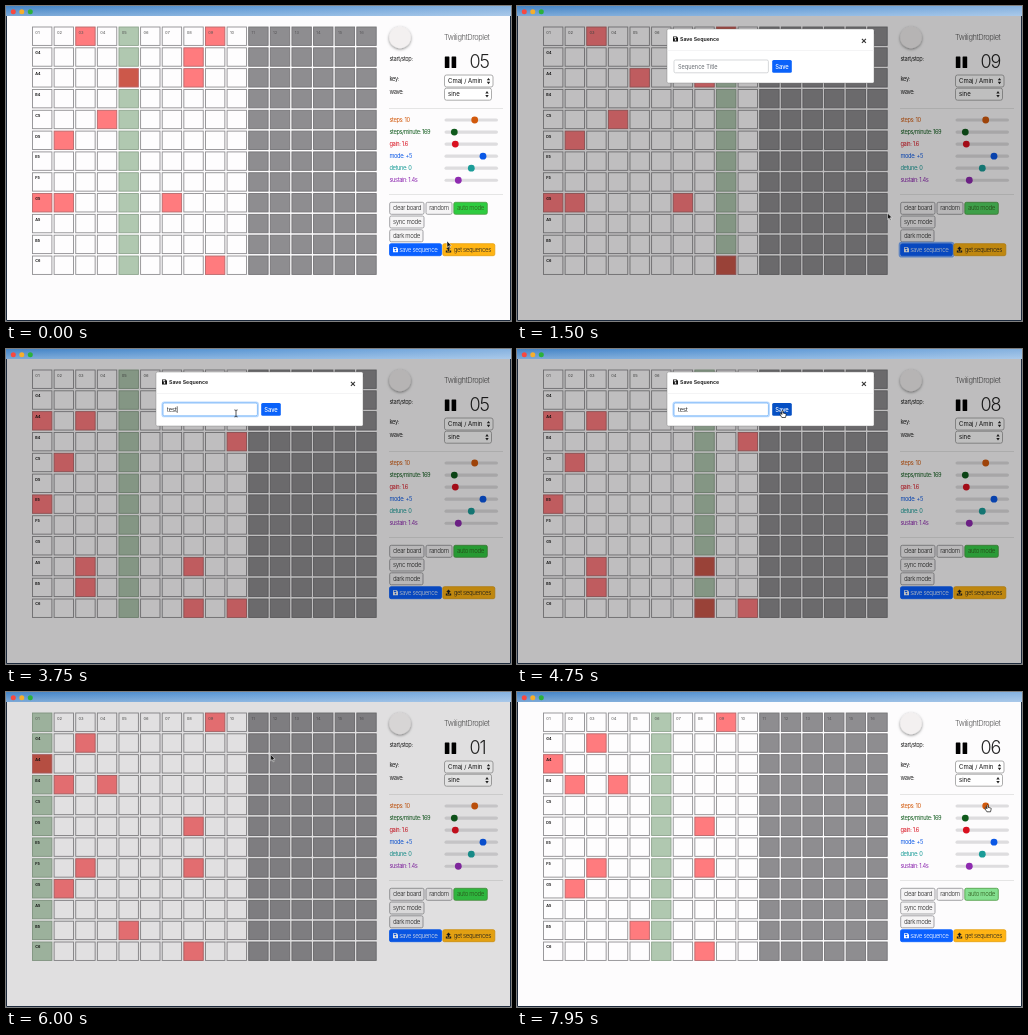
An HTML page that plays this animation: 505 px wide and 315 px high, repeating every 8000 ms.

```html
<!DOCTYPE html>
<html lang="en">
<head>
<meta charset="utf-8">
<title>Step sequencer</title>
<style>
  html, body { margin: 0; width: 100%; height: 100%; overflow: hidden; background: #fdfcfd; }
  svg { display: block; width: 100vw; height: 100vh; }
  text { font-family: Inter, "Liberation Sans", sans-serif; }
  .thin { font-weight: 300; letter-spacing: -.06em; }
  .label { font-weight: 400; letter-spacing: -.07em; }
</style>
</head>
<body>
<svg id="stage" viewBox="0 0 505 315" preserveAspectRatio="none">
  <defs>
    <linearGradient id="sky"><stop stop-color="#4484c6"/><stop offset=".5" stop-color="#5f9ad6"/><stop offset="1" stop-color="#86b2e0"/></linearGradient>
    <linearGradient id="haze" x2="0" y2="1"><stop stop-color="#fff" stop-opacity="0"/><stop offset="1" stop-color="#fff" stop-opacity=".3"/></linearGradient>
    <filter id="shadow" x="-50%" y="-50%" width="200%" height="200%">
      <feDropShadow dx="0" dy="1" stdDeviation="1.5" flood-opacity=".5"/>
    </filter>
  </defs>
</svg>
<script>
const LOOP = 8000, STEP = 363, STEP_OFFSET = 15, FIRST_STEP = 4;
const COLS = 16, ACTIVE_COLS = 10, PULSE = 1223, DIM = .25;
const NOTES = ['', 'G4', 'A4', 'B4', 'C5', 'D5', 'E5', 'F5', 'G5', 'A5', 'B5', 'C6'];
// One entry per row; each digit is a lit column, 0 stands for column ten.
const BOARDS = [
  '39,8,58,,4,2,,,127,,,9',
  ',,13,0,2,,1,,,38,3,80',
  '9,3,1,24,,8,,38,2,,5,8'
].map(board => board.split(','));

const stage = document.getElementById('stage');
const clamp = x => Math.min(1, Math.max(0, x));
const span = (t, from, length) => clamp((t - from) / length);
const easeOut = x => 1 - (1 - x) ** 3;
const easeInOut = x => x * x * (3 - 2 * x);
const pad = n => String(n).padStart(2, '0');

function set(node, attrs) {
  for (const key in attrs) node.setAttribute(key, attrs[key]);
  return node;
}
function add(tag, attrs, parent = stage) {
  return parent.appendChild(set(document.createElementNS('http://www.w3.org/2000/svg', tag), attrs));
}
function rect(x, y, width, height, fill, extra = {}, parent) {
  return add('rect', { x, y, width, height, fill, ...extra }, parent);
}
function text(x, y, size, content, extra = {}, parent) {
  const node = add('text', { x, y, 'font-size': size, fill: '#333', ...extra }, parent);
  node.textContent = content;
  return node;
}
const thin = (x, y, size, content, fill = '#333') => text(x, y, size, content, { class: 'thin', fill });
const label = (x, y, content, fill = '#222') => text(x, y, 5.7, content, { class: 'label', fill });
const show = (node, visible) => set(node, { visibility: visible ? 'visible' : 'hidden' });

// Window
rect(0, 0, 505, 315, '#fdfcfd');
rect(0, 0, 505, 10, 'url(#sky)');
rect(0, 0, 505, 10, 'url(#haze)');
['#f9483f', '#f6ae2c', '#2bb13b'].forEach((fill, i) =>
  add('circle', { cx: 7.3 + i * 8.5, cy: 5.8, r: 2.5, fill }));

// Board
const cells = NOTES.map((note, row) => Array.from({ length: COLS }, (_, col) =>
  rect(26.5 + col * 21.62, 21 + row * 20.82, 19.4, 18.4, '#fff', { 'stroke-width': .9 })));
for (let col = 0; col < COLS; col++)
  text(29.3 + col * 21.62, 27.6, 4.1, pad(col + 1), { fill: col < ACTIVE_COLS ? '#555' : '#58575a' });
NOTES.forEach((note, row) =>
  text(29.3, 27.4 + row * 20.82, 3.7, note, { 'font-weight': 700, fill: '#111' }));

// Transport
add('circle', { cx: 394, cy: 31.5, r: 10.7, fill: '#f3f0f0', filter: 'url(#shadow)' });
thin(438, 33.5, 7.5, 'TwilightDroplet', '#555');
label(383.5, 55, 'start/stop:');
rect(438.8, 50.5, 4.6, 11.5, '#000', { rx: .6 });
rect(445.6, 50.5, 4.6, 11.5, '#000', { rx: .6 });
const counter = thin(463.5, 61.6, 18, '', '#222');

function select(y, width, name, value) {
  label(383.5, y + 6, name);
  rect(438.5, y, width, 12, '#fff', { rx: 2, stroke: '#999', 'stroke-width': .8 });
  text(442, y + 8.2, 6, value, { fill: '#111' });
  const x = 438.5 + width - 4.5;
  add('path', { d: `M${x - 1.7} ${y + 5.3}l1.7-2.4 1.7 2.4zM${x - 1.7} ${y + 6.8}l1.7 2.4 1.7-2.4z`, fill: '#222' });
}
select(69, 48.5, 'key:', 'Cmaj / Amin');
select(82.2, 47, 'wave:', 'sine');

// Sliders
rect(383, 102, 114, .7, '#dcdcdc');
rect(383, 188, 114, .7, '#dcdcdc');
[
  ['steps: 10', 468.7, '#d2590c'],
  ['steps/minute: 169', 448.3, '#0f5a1c'],
  ['gain: 1.6', 449.3, '#d9101f'],
  ['mode: +5', 477, '#0a58e6'],
  ['detune: 0', 465.3, '#1b9c98'],
  ['sustain: 1.4s', 452.3, '#8e2bb0']
].forEach(([name, x, fill], i) => {
  const y = 114 + i * 12.05;
  label(383.5, y + 1.8, name, fill);
  rect(438.5, y - 1.6, 53.5, 3.2, '#dedddf', { rx: 1.6 });
  add('circle', { cx: x, cy: y, r: 3.4, fill });
});

// Buttons
function button(x, y, width, caption, fill = '#f5f4f5', stroke = '#8f8f92', color = '#222', inset = 3.3) {
  const box = rect(x, y, width, 12, fill, { rx: 1.6, stroke, 'stroke-width': .8 });
  thin(x + inset, y + 8.1, 6.1, caption, color);
  return box;
}
button(383.7, 196.3, 34.3, 'clear board');
button(420, 196.3, 26, 'random');
const auto = button(447.8, 196.3, 33.5, 'auto mode', '#2ecc40', '#4b9a3f', '#2f5a1c');
button(383.7, 210, 34.3, 'sync mode');
button(383.7, 223.8, 33.3, 'dark mode');
const ring = rect(382.4, 236.6, 54.2, 14.2, 'none', { rx: 2.4, stroke: '#7fb0ff', 'stroke-width': 1.5 });
const save = button(383.5, 237.7, 52, 'save sequence', '#0a60ff', '#0a60ff', '#fff', 9.8);
button(436.8, 237.7, 52, 'get sequences', '#ffb414', '#e6a010', '#222', 11);

function floppy(x, y, fill, hole, parent) {
  add('path', { d: `M${x} ${y}h3.8l1.2 1.2v3.8h-5z`, fill }, parent);
  rect(x + .8, y + .7, 2.4, 1.2, hole, {}, parent);
  add('circle', { cx: x + 2.5, cy: y + 3.4, r: .8, fill: hole }, parent);
}
floppy(387, 241.2, '#fff', '#0a60ff');
add('path', { d: 'M442.5 240.6l2.3 2.5h-1.4v1.9h-1.8v-1.9h-1.4zM439.8 244.6h1.2v1h3v-1h1.2v1.9h-5.4z', fill: '#222' });

// Dialog
const backdrop = rect(0, 10, 505, 305, '#000');
const dialog = add('g', {});
rect(150, 23, 207, 54, '#fff', { rx: 1.6, stroke: '#777', 'stroke-width': .4 }, dialog);
floppy(156, 30.5, '#111', '#fff', dialog);
text(163, 35.2, 5.2, 'Save Sequence', { 'font-weight': 700, fill: '#222' }, dialog);
add('path', { d: 'M344.9 32.8l4 4m0-4l-4 4', stroke: '#333', 'stroke-width': 1.1 }, dialog);
rect(150, 44, 207, .5, '#e8e8ea', {}, dialog);
const glow = rect(156.2, 53.2, 96, 14.4, 'none', { rx: 2.2, stroke: '#b9d9ff', 'stroke-width': 1.5 }, dialog);
const field = rect(157, 54, 94.4, 12.8, '#fff', { rx: 1.5, 'stroke-width': .7 }, dialog);
const entry = text(161, 62.8, 5.6, '', {}, dialog);
const caret = rect(171.3, 57.3, .6, 6.6, '#111', {}, dialog);
const confirm = rect(255.2, 54, 19.6, 12.8, '#0a62fa', { rx: 1.5 }, dialog);
text(265, 62.6, 5.8, 'Save', { fill: '#fff', 'text-anchor': 'middle', 'font-weight': 500 }, dialog);

// Window edge
add('path', { d: 'M.5 10V314.5H504.5V10', fill: 'none', stroke: '#1d2a3c' });

// Pointer
const cursor = add('g', {});
const pointers = {
  arrow: add('path', { d: 'M0 0V6.4L1.5 5.1 2.5 7.4 3.5 7 2.5 4.7H4.5z', fill: '#111', stroke: '#fff', 'stroke-width': .5 }, cursor),
  hand: add('path', { d: 'M-.6.5Q0-.5.6.5V2.5L3.2 3.2Q3.8 3.5 3.6 4.5L3 7H-.6L-2.3 4.3Q-2-.0-.6 4z', fill: '#fff', stroke: '#111', 'stroke-width': .7 }, cursor),
  beam: add('path', { d: 'M-1.6-3.4Q0-3.4 0-2.5 0-3.4 1.6-3.4M0-2.5V2.7M-1.6 3.6Q0 3.6 0 2.7 0 3.6 1.6 3.6', fill: 'none', stroke: '#111', 'stroke-width': .7 }, cursor)
};
const PATH = [
  [0, 441, 235], [150, 441, 235], [650, 408, 245], [1250, 408, 245], [2100, 230, 64.3],
  [4250, 230, 64.3], [4650, 265.5, 61.5], [6300, 264.5, 62.5], [7400, 470.5, 112.8], [LOOP, 470.5, 112.8]
];
const KINDS = [[450, 'arrow'], [1250, 'hand'], [2050, 'arrow'], [4330, 'beam'], [4500, 'arrow'], [5700, 'hand'], [7350, 'arrow'], [LOOP + 1, 'hand']];

function drawBoard(t) {
  const index = Math.floor((t + STEP_OFFSET) / STEP);
  const step = (FIRST_STEP + index) % ACTIVE_COLS;
  const board = BOARDS[Math.floor((FIRST_STEP + index) / ACTIVE_COLS)];
  cells.forEach((line, row) => line.forEach((cell, col) => {
    const active = col < ACTIVE_COLS;
    const lit = active && board[row].includes((col + 1) % 10);
    const current = col === step;
    const fill = !active ? '#8e8d90' : lit ? (current ? '#cc584a' : '#ff7b7e') : current ? '#b0c8b0' : '#fefdfe';
    const stroke = !active ? '#767578' : lit ? '#b9686b' : current ? '#8fa58f' : '#908f92';
    set(cell, { fill, stroke });
  }));
  counter.textContent = pad(step + 1);
}

function drawDialog(t) {
  const opening = span(t, 1170, 300), closing = span(t, 5620, 300);
  set(backdrop, { opacity: DIM * (span(t, 1010, 160) - span(t, 5920, 150)) });
  const opacity = span(t, 1170, 150) - span(t, 5620, 150);
  const shift = -17 * (1 - easeOut(opening) + easeOut(closing));
  set(dialog, { opacity, transform: `translate(0 ${shift})` });

  const focused = t >= 2600;
  const typed = 'test'.slice(0, Math.max(0, Math.floor((t - 3000) / 227) + 1));
  show(glow, focused && opacity > 0);
  set(field, { stroke: focused ? '#5fa8f5' : '#c4c7cb' });
  entry.textContent = typed || 'Sequence Title';
  set(entry, { fill: typed ? '#222' : '#62676d' });
  const blink = (t - (t < 3680 ? 2600 : 3680)) % 1120 < 560;
  show(caret, focused && blink && opacity > 0);
  set(caret, { x: 161 + (typed ? entry.getComputedTextLength() : 0) });
  set(confirm, { fill: t > 4520 && t < 5700 ? '#0650c4' : '#0a62fa' });
}

function drawButtons(t) {
  const glowLevel = .5 + .5 * Math.cos(2 * Math.PI * t / PULSE);
  set(auto, { 'fill-opacity': .58 + .42 * glowLevel });
  set(save, { fill: t > 500 && t < 1250 ? '#0556e6' : '#0a60ff' });
  show(ring, t > 900 && t < 2600);
}

function drawCursor(t) {
  const i = PATH.findIndex((point, n) => n && t <= point[0]);
  const [t0, x0, y0] = PATH[i - 1], [t1, x1, y1] = PATH[i];
  const k = easeInOut(span(t, t0, t1 - t0));
  set(cursor, { transform: `translate(${x0 + (x1 - x0) * k} ${y0 + (y1 - y0) * k})` });
  const kind = KINDS.find(([until]) => t < until)[1];
  for (const name in pointers) show(pointers[name], name === kind);
}

function draw(t) {
  drawBoard(t);
  drawDialog(t);
  drawButtons(t);
  drawCursor(t);
}

const start = performance.now();
function tick() {
  draw((performance.now() - start) % LOOP);
  requestAnimationFrame(tick);
}
tick();
</script>
</body>
</html>
```
